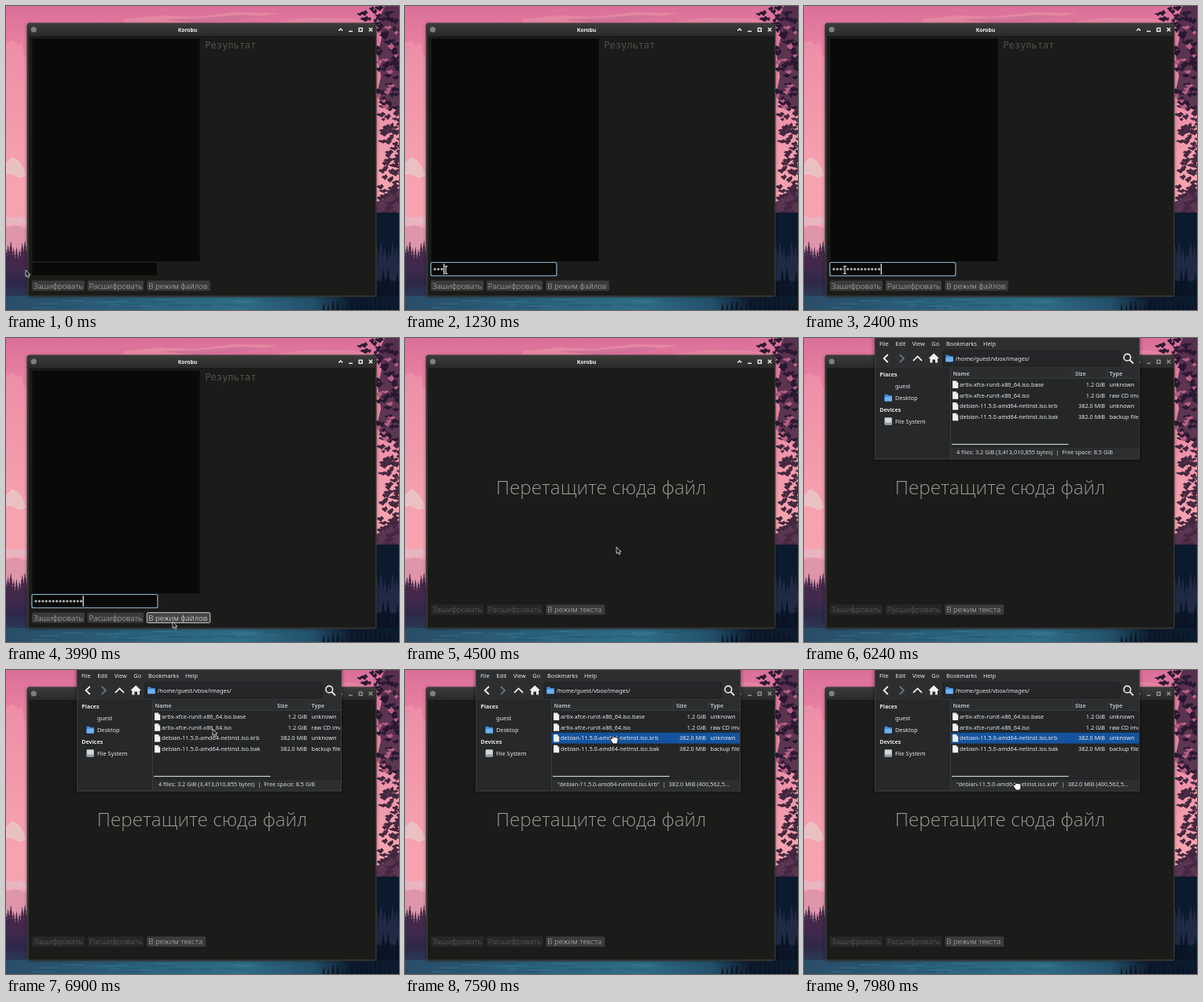
Write an HTML page that moves like this. It is 500 px wide and 387 px high and loops after 8 s.

```html
<!DOCTYPE html>
<html lang="ru">
<head>
<meta charset="utf-8">
<title>Korobu</title>
<style>
  html, body { margin: 0; width: 100%; height: 100%; overflow: hidden; background: #1b1b19; }
  svg { display: block; width: 100%; height: 100%; }
  text { white-space: pre; }
  .ui { font-family: "Open Sans", "Noto Sans", sans-serif; font-weight: 300; }
  .sys { font-family: "Noto Sans", "Open Sans", sans-serif; }
  .mono { font-family: "DejaVu Sans Mono", monospace; }
  .bold { font-weight: 700; }
</style>
</head>
<body>
<svg id="stage" viewBox="0 0 500 387">
  <defs>
    <linearGradient id="sky" x1="0" y1="0" x2="0" y2="1">
      <stop offset="0" stop-color="#da7099"/>
      <stop offset=".12" stop-color="#e87fa2"/>
      <stop offset=".4" stop-color="#f096ab"/>
      <stop offset=".6" stop-color="#f8a5b0"/>
      <stop offset=".8" stop-color="#f3a0ae"/>
    </linearGradient>
    <linearGradient id="grove" x1="0" y1="0" x2="0" y2="1">
      <stop offset="0" stop-color="#4a2c50"/>
      <stop offset=".45" stop-color="#2e2748"/>
      <stop offset="1" stop-color="#2a4a63"/>
    </linearGradient>
    <linearGradient id="water">
      <stop offset="0" stop-color="#2a4d67"/>
      <stop offset=".3" stop-color="#2a5f7a"/>
      <stop offset=".6" stop-color="#2f6d88"/>
      <stop offset=".78" stop-color="#23506a"/>
      <stop offset=".88" stop-color="#0d1b2e"/>
    </linearGradient>
    <linearGradient id="bar" x1="0" y1="0" x2="0" y2="1">
      <stop offset="0" stop-color="#3b3c3a"/>
      <stop offset="1" stop-color="#292a28"/>
    </linearGradient>
    <filter id="blur" x="-10%" y="-10%" width="120%" height="120%"><feGaussianBlur stdDeviation="2"/></filter>
    <clipPath id="pane"><rect width="425.5" height="154"/></clipPath>
  </defs>
</svg>
<script>
const LOOP = 8000, TICK = 30;
const stage = document.getElementById('stage');

function add(parent, tag, attrs, content) {
  const node = document.createElementNS('http://www.w3.org/2000/svg', tag);
  for (const key in attrs) node.setAttribute(key, attrs[key]);
  if (content) node.textContent = content;
  parent.appendChild(node);
  return node;
}
const group = (parent, attrs) => add(parent, 'g', attrs);
const box = (parent, x, y, width, height, fill, more) =>
  add(parent, 'rect', { x, y, width, height, fill, ...more });
const shape = (parent, d, fill, more) => add(parent, 'path', { d, fill, ...more });
const line = (parent, d, stroke, width = 1, more) =>
  shape(parent, d, 'none', { stroke, 'stroke-width': width, ...more });
const label = (parent, x, y, str, size, fill, cls = 'sys', more) =>
  add(parent, 'text', { x, y, fill, 'font-size': size, class: cls, ...more }, str);
const show = (node, on) => node.setAttribute('visibility', on ? 'inherit' : 'hidden');

let seed = 11;
function rand(a, b) {
  seed = (seed * 16807) % 2147483647;
  return a + (b - a) * seed / 2147483647;
}

// Wallpaper
function conifer(parent, x, base, height, fill) {
  let left = '', right = '';
  for (let i = 1; i <= 6; i++) {
    const y = base - height * (1 - i / 6), w = height * 0.028 * i;
    left = `L${x - w * 0.5} ${y - 1}L${x - w} ${y}${left}`;
    right += `L${x + w} ${y}L${x + w * 0.5} ${y - 1}`;
  }
  shape(parent, `M${x} ${base - height}${right}L${x} ${base}${left}Z`, fill);
}

// Ragged leaf clumps scattered over an area
function foliage(parent, count, x0, x1, y0, y1, fill) {
  for (let i = 0; i < count; i++) {
    const x = rand(x0, x1), y = rand(y0, y1), w = rand(5, 13), h = rand(2, 4);
    shape(parent, `M${x - w / 2} ${y}l${w * 0.25} ${-h * 0.6}l${w * 0.15} .8l${w * 0.3} ${-h * 0.7}` +
      `l${w * 0.3} ${h}l${-w * 0.2} ${h * 0.4}l${-w * 0.2} ${h * 0.8}l${-w * 0.3} ${-h * 0.6}Z`, fill);
  }
}

function wallpaper(parent) {
  box(parent, 0, 0, 500, 387, 'url(#sky)');
  shape(parent, 'M0 47L9 44L14 50L20 47L23 62L28 66V250H0Z', '#f4a0b0', { opacity: 0.45 });
  shape(parent, 'M0 200L8 192L16 197L22 206L26 216L18 219L6 214L0 215Z', '#e9c5c9', { opacity: 0.85 });
  shape(parent, 'M150 17L195 12L240 14L290 8L348 9L320 14L270 18L220 22H150Z', '#eb94a8', { opacity: 0.6 });
  shape(parent, 'M195 17L250 15L300 11L328 13L290 18L240 21Z', '#c66a94', { opacity: 0.6 });
  shape(parent, 'M345 20L385 15L440 16L472 22H350Z', '#eb97ab', { opacity: 0.5 });
  shape(parent, 'M0 268L12 270L20 267L28 272V278L12 280L0 279Z', '#e3bcc8', { opacity: 0.7 });
  shape(parent, 'M0 282L12 279L28 284V320H0Z', '#e096aa');

  foliage(parent, 14, 450, 490, 2, 20, '#2c1a34');
  shape(parent, 'M474 18L478 40L473 62L477 90L472 112L480 130H500V0H482Z', '#2c1a34', { opacity: 0.75 });
  foliage(parent, 60, 470, 500, 16, 132, '#2a1832');
  foliage(parent, 14, 472, 498, 20, 130, '#b95f83');
  foliage(parent, 55, 477, 502, 130, 215, '#43283f');
  shape(parent, 'M470 250L480 246L488 238L500 232V270H470Z', '#5a3552');
  foliage(parent, 35, 475, 502, 212, 264, '#43283f');

  box(parent, 0, 322, 28, 65, 'url(#grove)');
  for (let x = -1; x < 30; x += 3.6) conifer(parent, x, 332, rand(22, 38), '#43294b');
  box(parent, 470, 263, 30, 124, '#0c1a2d');
  for (let x = 472; x < 504; x += 5) conifer(parent, x, 350, rand(35, 60), '#212a44');
  for (let x = 474; x < 504; x += 6) conifer(parent, x, 390, rand(35, 60), '#0a1424');
  box(parent, 0, 369, 500, 18, 'url(#water)');
  for (let i = 0; i < 26; i++) {
    const x = rand(20, 370), y = rand(373, 386);
    line(parent, `M${x} ${y}h${rand(8, 34)}`, i % 2 ? '#4288a0' : '#1d4a63', 0.8, { opacity: 0.6 });
  }
  for (let x = 404; x < 502; x += 6) conifer(parent, x, 389, rand(8, 18), '#0a1424');
}

// Main window
function button(parent, x, y, width, str, enabled = true) {
  const g = group(parent);
  const face = box(g, x, y, width, 13, enabled ? '#3b3b3a' : '#272726', { rx: 1.5 });
  const text = label(g, x + 2, y + 9.9, str, 9.7, enabled ? '#c6c6c6' : '#686866', 'ui');
  const hover = on => {
    face.setAttribute('fill', on ? '#464645' : '#3b3b3a');
    face.setAttribute('stroke', on ? '#c8c8c8' : 'none');
    text.setAttribute('fill', on ? '#ffffff' : '#c6c6c6');
  };
  return { hover, hit: (px, py) => px > x && px < x + width && py > y && py < y + 13 };
}

wallpaper(group(stage));
const main = group(stage);
box(main, 26, 22, 446, 349, '#000', { rx: 4, opacity: 0.25, filter: 'url(#blur)' });
box(main, 26.5, 21.5, 445, 349, '#343533', { rx: 3.5 });
box(main, 27, 22, 444, 17, 'url(#bar)', { rx: 3 });
box(main, 29, 38, 441, 330.5, '#1b1b19');
add(main, 'circle', { cx: 35.3, cy: 30, r: 3.6, fill: '#7d8081' });
label(main, 231, 32.5, 'Korobu', 6.8, '#f0f0f0', 'sys bold', { 'text-anchor': 'middle' });
const controls = group(main, { fill: 'none', 'stroke-width': 1.5 });
shape(controls, 'M423.3 31.4L425.7 29L428.1 31.4M436 32.3H441M449.2 28.2h4v4h-4ZM461.8 27.8l4.4 4.4m0-4.4l-4.4 4.4', 'none');

const textMode = group(main);
box(textMode, 33.5, 41.5, 213, 283.5, '#090908');
label(textMode, 253.3, 54, 'Результат', 12, '#4f4f4d', 'mono');
box(textMode, 33.5, 327, 158.5, 16, '#090908', { rx: 1 });
const focusRing = box(textMode, 32.9, 326.5, 160, 17, '#090908', { rx: 2, stroke: '#86b5cb', 'stroke-width': 1.2 });
const PITCH = 4.43;
const dots = Array.from({ length: 14 }, (_, i) =>
  add(textMode, 'circle', { cx: 38 + i * PITCH, cy: 335, r: 1.6, fill: '#b9b9b9' }));
const caret = box(textMode, 0, 328, 1.3, 14, '#d8e6ee');
const buttons = [
  button(textMode, 33, 349.6, 67, 'Зашифровать'),
  button(textMode, 103.7, 349.6, 71.5, 'Расшифровать'),
  button(textMode, 179.3, 349.6, 80.5, 'В режим файлов')
];

const fileMode = group(main);
label(fileMode, 249.5, 198.8, 'Перетащите сюда файл', 24.25, '#979795', 'ui', { 'text-anchor': 'middle' });
button(fileMode, 33, 339.3, 67, 'Зашифровать', false);
button(fileMode, 103.7, 339.3, 71.5, 'Расшифровать', false);
button(fileMode, 179.3, 339.3, 75, 'В режим текста');

// File manager
const tip = box(stage, 254.5, -4, 109, 10.5, '#2b2c2d', { rx: 2.5 });
const outline = group(stage);
line(outline, 'M91 0V153.5H426V0', '#3d3f3d', 2.4);

const files = group(stage);
const SIZE = 7.33, INK = '#e6e7e8';
box(files, 89, -8, 339, 164, '#000', { opacity: 0.4, filter: 'url(#blur)' });
box(files, 90, -2, 337, 156.5, '#2c2e30');
[['File', 96], ['Edit', 116.3], ['View', 137.7], ['Go', 162.3], ['Bookmarks', 181], ['Help', 228]]
  .forEach(([str, x]) => label(files, x, 9.8, str, SIZE, INK));
line(files, 'M106.8 21L101.6 26L106.8 31M139 28.8L144.5 23.4L150 28.8', '#f0f0f0', 1.8);
line(files, 'M121.8 21L127 26L121.8 31', '#6e7173', 1.8);
shape(files, 'M165.2 19.5L172 26H170V31.5H167V27.5H163.4V31.5H160.4V26H158.4Z', '#f0f0f0');
box(files, 176.5, 16, 226, 19.5, '#242628', { rx: 2.5, stroke: '#1a1c1d', 'stroke-width': 0.8 });

function folder(x, y) {
  shape(files, `M${x} ${y}h3.6l1.2 1.4h4.6v7.4h-9.4Z`, '#3f87d6');
  box(files, x, y + 3, 9.4, 5.8, '#6eb0f0', { rx: 0.7 });
}
folder(180.3, 21.5);
label(files, 192.5, 28.8, '/home/guest/vbox/images/', SIZE, INK);
add(files, 'circle', { cx: 411.3, cy: 24.7, r: 4.3, fill: 'none', stroke: '#f0f0f0', 'stroke-width': 1.6 });
line(files, 'M414.4 27.9L419 32.4', '#f0f0f0', 1.9);

box(files, 91, 38, 95, 115, '#26282a');
label(files, 96.3, 48.9, 'Places', 7.1, INK, 'sys bold');
label(files, 116, 63.8, 'guest', SIZE, INK);
folder(102.5, 71.7);
label(files, 116, 78.7, 'Desktop', SIZE, INK);
label(files, 96.3, 93.9, 'Devices', 7.1, INK, 'sys bold');
box(files, 102.6, 101.3, 9.2, 9.2, '#d4d6d8', { rx: 1 });
box(files, 102.6, 107.4, 9.2, 3.1, '#999da0', { rx: 0.8 });
label(files, 116, 108.8, 'File System', SIZE, INK);

box(files, 187, 38, 239.5, 101, '#242628');
box(files, 187, 38, 239.5, 13.3, '#2b2d2f');
line(files, 'M186.5 38V153M187 51.3H426M341.3 38.5V51M385.2 38.5V51', '#3e4143', 0.8);
[['Name', 189.5], ['Size', 345], ['Type', 388.5]]
  .forEach(([str, x]) => label(files, x, 47.5, str, 7.1, '#b5b8ba', 'sys', { 'font-weight': 600 }));
const selection = box(files, 187, 79.8, 239.5, 13.8, '#15539e');
const list = group(files, { 'clip-path': 'url(#pane)' });
[
  ['artix-xfce-runit-x86_64.iso.base', '1.2 GiB', 'unknown'],
  ['artix-xfce-runit-x86_64.iso', '1.2 GiB', 'raw CD image'],
  ['debian-11.5.0-amd64-netinst.iso.krb', '382.0 MiB', 'unknown'],
  ['debian-11.5.0-amd64-netinst.iso.bak', '382.0 MiB', 'backup file']
].forEach(([name, size, type], i) => {
  const y = 59.2 + i * 13.75;
  shape(list, `M189 ${y - 4.6}h4.6l2.6 2.6v6.8h-7.2Z`, '#f1f1f1');
  shape(list, `M193.6 ${y - 4.6}v2.6h2.6Z`, '#b4b6b8');
  label(list, 198, y + 2.7, name, SIZE, INK);
  label(list, 383, y + 2.7, size, SIZE, INK, 'sys', { 'text-anchor': 'end' });
  label(list, 388.5, y + 2.7, type, SIZE, INK);
});
box(files, 188, 134.8, 148.5, 1.2, '#c9cbcc');
line(files, 'M187 139.2H426', '#1f2122', 0.8);
const status = [
  '4 files: 3.2 GiB (3,413,010,855 bytes)  |  Free space: 8.5 GiB',
  '"debian-11.5.0-amd64-netinst.iso.krb"  |  382.0 MiB (400,562,5…'
].map(str => label(files, 194, 148.4, str, SIZE, '#d5d7d8'));
line(files, 'M90.5 0V154H426.5V0', '#3a3c3d', 1);

// Pointers, each with its hot spot at 0,0
const pointer = group(stage);
const arrow = shape(pointer, 'M0 0V8.4L1.9 6.7L3.3 9.7L4.8 9L3.5 6.1H6Z', '#1a1a1a',
  { stroke: '#e4e4e4', 'stroke-width': 0.8, 'stroke-linejoin': 'round' });
const beam = group(pointer);
const BEAM = 'M-2.2 -4.8H-.6L0 -4.2L.6 -4.8H2.2M0 -4.2V4.2M-2.2 4.8H-.6L0 4.2L.6 4.8H2.2';
line(beam, BEAM, '#111', 2.4);
line(beam, BEAM, '#e8e8e8', 1.1);
const hand = shape(pointer, 'M-1.2 3.2Q-1.6 1.8 0 2L1.4 2.6V.8Q2.2 -.4 3.2 .5Q4.2 -.5 5.2 .5Q6.2 -.2 7 .8' +
  'Q8.8 .2 9 2V5.6L7.8 9H2.6Z', '#f6f6f6', { stroke: '#0c0c0c', 'stroke-width': 1, 'stroke-linejoin': 'round' });

// Time, x, y and easing of the way there
const smooth = p => p * p * (3 - 2 * p), linear = p => p, speedUp = p => p ** 1.7;
const path = [
  [0, 25, 336, linear], [30, 25, 336, linear], [330, 52, 336, smooth],
  [3210, 52, 336, linear], [3840, 212, 361, smooth], [4140, 212, 361, linear],
  [4500, 269, 266, speedUp], [4710, 300, -20, linear],
  [6090, 312, -20, linear], [6900, 263, 75, smooth], [7200, 260, 92, smooth],
  [7500, 262, 85, smooth], [7590, 262, 85, linear], [7980, 267, 144, smooth], [LOOP, 267, 144, linear]
];
const keys = [900, 1050, 1230, 1320, 1410, 1530, 1620, 1740, 1830, 1920, 2010, 2100, 2250, 2400];
const FOCUS = 690, SWITCH = 4080, TIP = 5190, OPEN = 5940, LOADED = 5970, GRAB = 7590;

function pointerAt(t) {
  const i = Math.max(1, path.findIndex(k => k[0] >= t));
  const [t0, x0, y0] = path[i - 1], [t1, x1, y1, ease] = path[i];
  const p = ease((t - t0) / (t1 - t0));
  return [x0 + (x1 - x0) * p, y0 + (y1 - y0) * p];
}

function render(t) {
  const [x, y] = pointerAt(t);
  const typing = t < SWITCH, grabbed = t >= GRAB, focused = t >= FOCUS;
  const typed = keys.filter(k => k <= t).length;

  show(textMode, typing);
  show(fileMode, !typing);
  show(focusRing, focused);
  show(caret, focused);
  caret.setAttribute('x', 35.6 + typed * PITCH);
  dots.forEach((dot, i) => show(dot, i < typed));
  buttons.forEach(b => b.hover(b.hit(x, y)));
  controls.setAttribute('stroke', t < OPEN ? '#e4e4e4' : '#8c8d8c');

  show(tip, t >= TIP && t < LOADED);
  show(outline, t >= OPEN && t < LOADED);
  show(files, t >= LOADED);
  show(selection, grabbed);
  show(status[0], !grabbed);
  show(status[1], grabbed);

  const overField = typing && x > 33 && x < 193 && y > 326 && y < 344;
  pointer.setAttribute('transform', `translate(${x} ${y})`);
  show(beam, overField);
  show(hand, grabbed);
  show(arrow, !overField && !grabbed);
}

const start = performance.now();
function frame() {
  const t = (performance.now() - start) % LOOP;
  render(Math.floor(t / TICK) * TICK);
  requestAnimationFrame(frame);
}
render(0);
requestAnimationFrame(frame);
</script>
</body>
</html>
```
